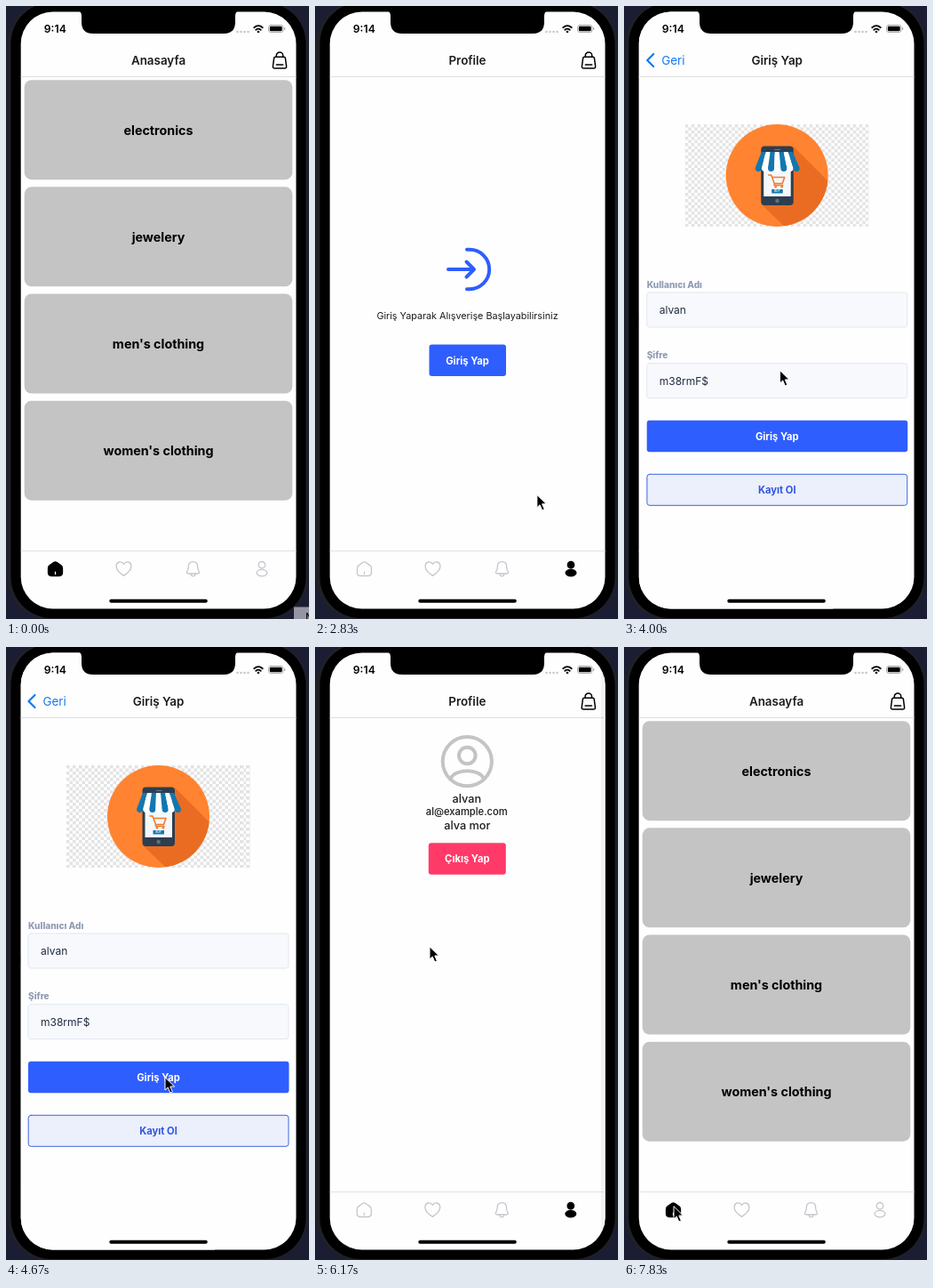
Animation of 341 by 689 pixels, one loop 8000 ms. Source, as an HTML page:

```html
<!DOCTYPE html>
<html lang="tr">
<head>
<meta charset="utf-8">
<style>
  html, body { margin: 0; width: 100%; height: 100%; overflow: hidden; background: #1b1d33; }
  svg { display: block; width: 100vw; height: 100vh; }
  text { font-family: Inter, "Open Sans", sans-serif; white-space: pre; }
</style>
</head>
<body>
<svg id="stage" viewBox="0 0 341 689" fill="none" stroke-linecap="round" stroke-linejoin="round"></svg>
<script>
const BLUE = '#2f5eff', INK = '#1c1c1e', IDLE = '#c5c6cc';
const SCREEN = { left: 17, width: 309.5 };

const rect = (x, y, w, h, r, fill, extra = '') =>
  `<rect x="${x}" y="${y}" width="${w}" height="${h}" rx="${r}" fill="${fill}" ${extra}/>`;
const circle = (x, y, r, attrs) => `<circle cx="${x}" cy="${y}" r="${r}" ${attrs}/>`;
const path = (d, attrs) => `<path d="${d}" ${attrs}/>`;
const line = (d, color, width = 1.3) => path(d, `stroke="${color}" stroke-width="${width}"`);
// y is the middle of the capital letters
const text = (str, x, y, size, weight, fill = INK, anchor = 'middle') =>
  `<text x="${x}" y="${y + size * 0.36}" font-size="${size}" font-weight="${weight}" fill="${fill}" text-anchor="${anchor}">${str}</text>`;

const header = title =>
  rect(16, 5, 312, 674, 0, '#fefefe') +
  line('M16 79.5H328', '#dededf', 1) +
  text(title, 171.5, 61, 13.4, 600);

const bag =
  line('M303.2 57.2h9.6q1.4 0 1.6 1.4l1.2 9.2q.2 2.2-2 2.2h-11.2q-2.2 0-2-2.2l1.2-9.2q.2-1.4 1.6-1.4z', '#000', 1.5) +
  line('M304.3 57v-1.6a3.7 3.3 0 0 1 7.4 0V57M304.3 66h7.4', '#000', 1.5);

function tabBar(active) {
  const shape = (d, on) => path(d, `stroke="${on ? '#000' : IDLE}" stroke-width="1.3" fill="${on ? '#000' : 'none'}"`);
  const home = active === 'home', person = active === 'profile';
  return line('M16 612.5H328', '#e2e2e3', 1) +
    shape('M54 625.3q1.5-1 3 0l5 3.6q1.5 1 1.5 3v5.2q0 3.4-3.4 3.4h-9.2q-3.4 0-3.4-3.4v-5.2q0-2 1.5-3z', home) +
    line('M55.5 636v2.6', home ? '#fff' : IDLE, 1.2) +
    shape('M132.5 640.4c-3-2-8.4-5.6-8.4-10.5 0-5.6 6-6.6 8.4-2.6 2.4-4 8.4-3 8.4 2.6 0 4.900-5.400 8.500-8.400 10.500z', false) +
    shape('M210.500 624.600c-3.600 0-5.200 2.600-5.200 5.600 0 3.600-1 4.400-1.700 5.800-.5 1.200.2 2 1.400 2h11c1.200 0 1.900-.8 1.400-2-.7-1.400-1.700-2.200-1.700-5.800 0-3-1.600-5.600-5.200-5.600zM208 638.300q.4 2.500 2.500 2.500t2.500-2.500', false) +
    shape('M284.300 628.200a3.700 3.700 0 1 1 7.400 0a3.700 3.700 0 1 1-7.400 0zM282.100 637.100a5.900 3.700 0 1 1 11.800 0a5.900 3.700 0 1 1-11.800 0z', person);
}

const home = header('Anasayfa') + bag + tabBar('home') +
  ['electronics', 'jewelery', "men's clothing", "women's clothing"].map((name, i) => {
    const y = 83.2 + i * 120.15;
    return rect(20.7, y, 301.6, 112, 8, '#c4c4c4') + text(name, 171.5, y + 56.3, 14.3, 700, '#000');
  }).join('');

const signedOut = header('Profile') + bag + tabBar('profile') +
  line('M171 273.800h3a22.200 22.200 0 0 1 0 44.400h-3M150 296h29m-8.500-8.500 8.500 8.500-8.500 8.500', BLUE, 4) +
  text('Giriş Yaparak Alışverişe Başlayabilirsiniz', 171.5, 348.5, 10.8, 400) +
  rect(128.5, 380.5, 86.5, 35.5, 3, BLUE) +
  text('Giriş Yap', 171.5, 398.500, 11.2, 700, '#fff');

const signedIn = header('Profile') + bag + tabBar('profile') +
  `<g stroke="#c4c4c4" stroke-width="4">${circle(171.5, 128.6, 27.6, '') + circle(171.5, 122, 9.3, '')}
   <path d="M152.500 148.500c5-12.500 33-12.500 38 0"/></g>` +
  text('alvan', 171, 170, 12.7, 500) +
  text('al@example.com', 171, 185, 11.2, 500) +
  text('alva mor', 171.5, 200, 12.7, 500) +
  rect(128, 220.3, 87, 35.5, 3, '#ff3a69') +
  text('Çıkış Yap', 171.5, 238.3, 11.2, 700, '#fff');

function shopArt() {
  let awning = '';
  for (let i = 0; i < 7; i++) {
    const color = i % 2 ? '#fff' : '#1278b0';
    const top = 154 + i * 5, low = 147 + i * 50 / 7, step = 50 / 7;
    awning += path(`M${top} 164h5L${low + step} 182a${step / 2} 4 0 0 1 ${-step} 0z`, `fill="${color}"`);
  }
  return rect(68, 133, 207, 115, 0, 'url(#checker)') +
    circle(171.5, 190.5, 57.5, 'fill="#ff8331"') +
    path('M190 158l70 70-30 40h-29l-47-45z', 'fill="#ea6c22" clip-path="url(#disc)"') +
    rect(153.5, 157.5, 36.5, 66.5, 4, '#2c3e50') +
    rect(156.5, 166, 30.5, 48, 0, '#f4f8fa') +
    line('M169 161.500h6', '#6b7b8a', 1) +
    circle(171.7, 219, 2.2, 'fill="#61707f"') + awning +
    line('M162 190h3l3.500 9.500h9l2.500-7h-14M168.500 199.500v2h9.500', '#f47a2c', 1.6) +
    circle(170, 203.3, 1.3, 'fill="#f47a2c"') + circle(177, 203.300, 1.300, 'fill="#f47a2c"') +
    rect(165.5, 206, 12.5, 4.500, 0.5, '#1278b0') +
    text('BUY', 171.7, 208.2, 3, 700, '#fff');
}

const field = (label, value, y) =>
  text(label, 25, y - 9, 10.1, 800, '#8f9bb3', 'start') +
  rect(25, y, 293, 39, 3, '#f7f9fc', 'stroke="#e1e7f2"') +
  text(value, 39, y + 19.7, 12, 400, '#222b45', 'start');

const login = header('Giriş Yap') +
  line('M32.500 54l-7 7 7 7', '#1579f0', 2.2) +
  text('Geri', 41.5, 61, 13.4, 400, '#1579f0', 'start') +
  shopArt() +
  field('Kullanıcı Adı', 'alvan', 322) +
  field('Şifre', 'm38rmF$', 401.7) +
  rect(25, 465.8, 293.5, 35.5, 3, BLUE, 'id="submit"') +
  `<g id="submitLabel">${text('Giriş Yap', 171.5, 483.5, 11.2, 700, '#fff')}</g>` +
  `<g id="register">${rect(25.2, 526.3, 292.8, 35, 3, '#eceffc', 'stroke="#3c66dc"') +
    text('Kayıt Ol', 171.5, 544, 11.2, 700, '#2f57e0')}</g>`;

const statusBar =
  path('M79 5q6 0 6 6v7q0 13 13 13H245q13 0 13-13v-7q0-6 6-6z', 'fill="#000"') +
  text('9:14', 55.3, 25.7, 12.2, 600, '#000') +
  [260.5, 264.5, 268.5, 272.5].map(x => circle(x, 29, 1.3, 'fill="#c8c8c8"')).join('') +
  line('M279.200 24.200q4.800-4.200 9.600 0M281.300 26.800q2.700-2.300 5.400 0', '#000', 1.8) +
  circle(284, 29, 1.3, 'fill="#000"') +
  rect(295.5, 21.5, 16.5, 8, 2.4, 'none', 'stroke="#999" stroke-width=".8"') +
  rect(296.8, 22.8, 13.9, 5.4, 1.3, '#000') +
  line('M313.700 24.600v1.800', '#999', 1) +
  rect(116.3, 666.7, 110.5, 4, 2, '#000');

stage.innerHTML = `
  <defs>
    <clipPath id="glass">${rect(16.7, 6.5, 309.8, 671, 36, '#000')}</clipPath>
    <clipPath id="disc">${circle(171.5, 190.5, 57.5, '')}</clipPath>
    <pattern id="checker" x="68" y="133" width="7" height="7" patternUnits="userSpaceOnUse">
      <path d="M0 0h7v7H0z" fill="#fff"/><path d="M0 0h3.500v3.500H0zM3.500 3.500H7V7H3.500z" fill="#e3e3e3"/>
    </pattern>
    <linearGradient id="edge"><stop stop-opacity="0"/><stop offset="1" stop-opacity=".1"/></linearGradient>
  </defs>
  ${rect(1, -6, 339, 696, 50, '#202126')}
  ${rect(5.5, -4, 332, 692, 46, '#000')}
  <g clip-path="url(#glass)">
    <g id="base">
      <g id="home">${home}</g><g id="signedOut">${signedOut}</g><g id="signedIn">${signedIn}</g>
    </g>
    <rect id="shade" width="341" height="689" fill="#000"/>
    <g id="login">${rect(12, 5, 5, 674, 0, 'url(#edge)')}${login}</g>
  </g>
  ${statusBar}
  <g id="tip">${rect(324, 675.5, 20, 16, 0, '#9595a3')}${text('N', 341, 686.5, 10, 600, '#111')}</g>
  <path id="cursor" d="M0 0V14l3.200-3 2.600 6 2.600-1.100-2.600-5.900H10.200z" fill="#000" stroke="#fff"/>`;

const el = id => document.getElementById(id);
const show = (id, on) => el(id).setAttribute('display', on ? 'inline' : 'none');
const move = (id, x, y = 0) => el(id).setAttribute('transform', `translate(${x} ${y})`);

const LOOP = 8000, STEP = 1000 / 6;
const TIP_END = 700, OPEN_PROFILE = 2200, PUSH = 3545, SUBMIT = 4900, POP = 5710, OPEN_HOME = 7600;
const cursorKeys = [
  [1300, 345, 695], [1950, 295, 640], [2500, 295, 640], [3300, 175, 400], [3850, 175, 400],
  [4550, 179, 484], [5550, 179, 484], [6100, 129, 337], [6600, 129, 337], [7500, 56, 629], [LOOP, 56, 629]
];

function cursorAt(t) {
  const i = cursorKeys.findIndex(key => key[0] > t);
  const [t0, x0, y0] = cursorKeys[i - 1], [t1, x1, y1] = cursorKeys[i];
  const u = (t - t0) / (t1 - t0), e = u * u * (3 - 2 * u);
  return [x0 + (x1 - x0) * e, y0 + (y1 - y0) * e];
}

// critically damped spring from 0 to 1
function spring(ms) {
  const wt = Math.max(0, ms) / 1000 * Math.sqrt(1000 / 3);
  return 1 - Math.exp(-wt) * (1 + wt);
}

function draw(t) {
  const pushed = spring(t - PUSH) - spring(t - POP);
  const loading = t >= SUBMIT && t < POP + 600;
  const onHome = t < OPEN_PROFILE || t >= OPEN_HOME;

  show('home', onHome);
  show('signedOut', !onHome && t < SUBMIT);
  show('signedIn', !onHome && t >= SUBMIT);
  move('base', -0.3 * SCREEN.width * pushed);
  el('shade').setAttribute('opacity', 0.115 * pushed);

  show('login', pushed > 0.002);
  move('login', SCREEN.width * (1 - pushed));
  el('submit').setAttribute('height', loading ? 38 : 35.5);
  show('submitLabel', !loading);
  move('register', 0, loading ? 2.5 : 0);

  show('tip', t < TIP_END);
  show('cursor', t >= cursorKeys[0][0]);
  if (t >= cursorKeys[0][0]) move('cursor', ...cursorAt(t));
}

function tick() {
  draw(Math.floor((performance.now() + 4) % LOOP / STEP) * STEP);
  requestAnimationFrame(tick);
}
tick();
</script>
</body>
</html>
```
